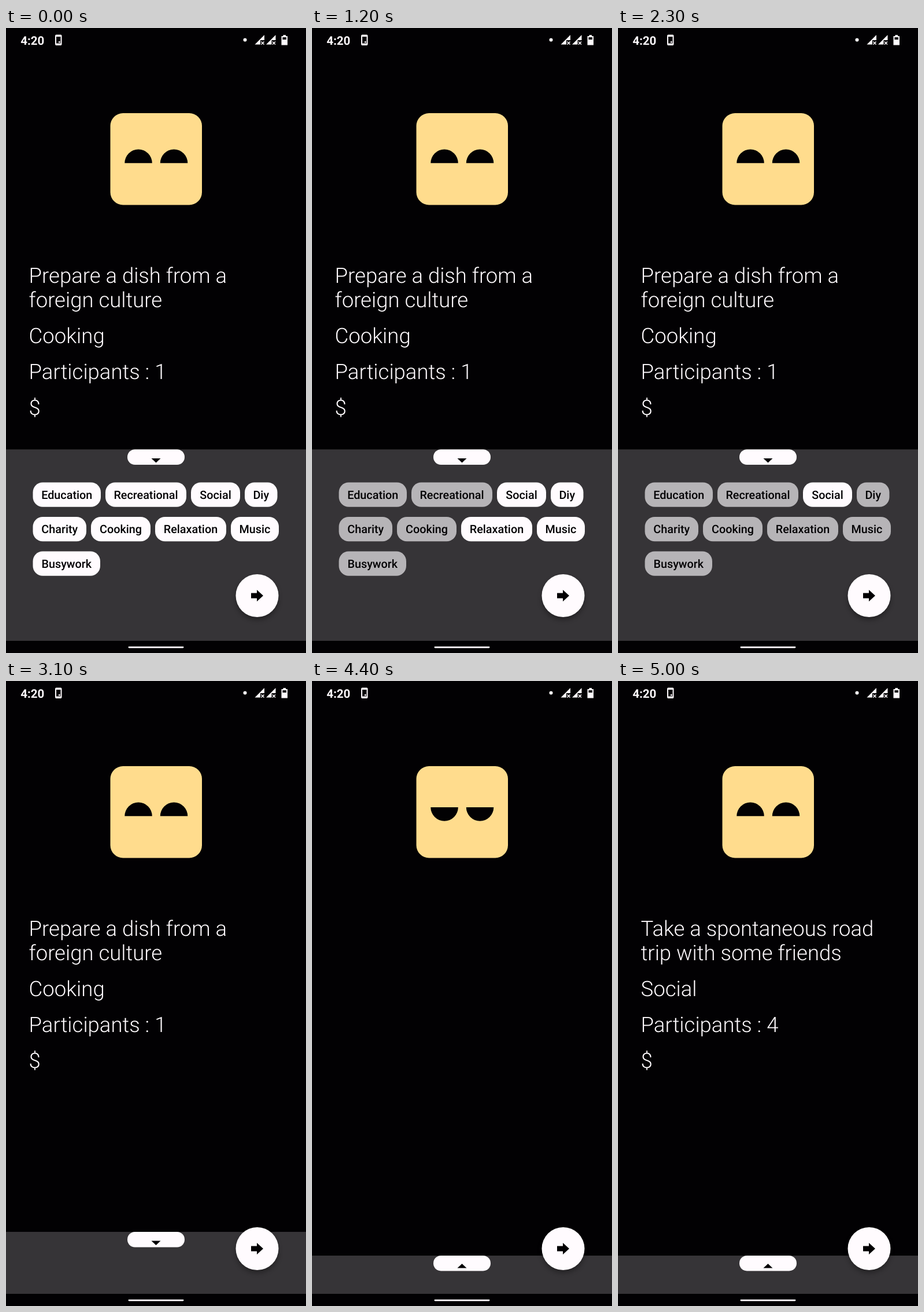
Animation, 519 px wide and 1079 px high, one loop 5.3 s. Source, as an HTML page:

```html
<!DOCTYPE html>
<html lang="en">
<head>
<meta charset="utf-8">
<style>
  html, body { margin: 0; width: 100%; height: 100%; overflow: hidden; background: #020103; }
  svg { display: block; width: 100%; height: 100%; }
  text { font-family: Roboto, sans-serif; text-rendering: geometricPrecision; }
  .info { font-size: 36.5px; font-weight: 300; fill: #fffbfe; }
  .chip { font-size: 19.8px; font-weight: 500; text-anchor: middle; fill: #020103; }
  .clock { font-size: 20.5px; font-weight: 700; fill: #fffbfe; }
</style>
</head>
<body>
<svg viewBox="0 0 519 1079">
  <defs>
    <filter id="blur" x="-50%" y="-50%" width="200%" height="200%"><feGaussianBlur stdDeviation="5"/></filter>
    <rect id="face" x="180.5" y="147" width="158.5" height="158.5" rx="22" fill="#ffdc8d"/>
    <g id="signal">
      <path d="M0 28.5L16.5 12V21H9.5V28.5Z"/>
      <path d="M11 23.5l5 5m0-5l-5 5" stroke="#fffbfe" stroke-width="1.6"/>
    </g>
  </defs>
  <rect width="519" height="1079" fill="#020103"/>

  <g fill="#fffbfe">
    <text class="clock" x="25.2" y="28.5">4:20</text>
    <path fill-rule="evenodd" d="M87 11.5h7.5a2 2 0 0 1 2 2v14.5a2 2 0 0 1-2 2h-7.5a2 2 0 0 1-2-2v-14.5a2 2 0 0 1 2-2zM87 15v11.5h7.5v-11.5z"/>
    <rect x="91" y="23" width="2.5" height="2.5"/>
    <circle cx="413.5" cy="20.5" r="3"/>
    <use href="#signal" x="430.5"/>
    <use href="#signal" x="450"/>
    <path fill-rule="evenodd" d="M479.5 12h4.5v2h3v15.5h-10.5v-15.5h3zM478.5 16v4h6.5v-4z"/>
  </g>

  <g id="before"></g>
  <g id="loading">
    <use href="#face"/>
    <path d="M205.3 218a23.75 23.75 0 0 0 47.5 0zm61.5 0a23.75 23.75 0 0 0 47.5 0z" fill="#020103"/>
  </g>
  <g id="after"></g>

  <g id="panel">
    <rect width="519" height="400" fill="#363437"/>
    <rect x="210" width="99" height="26.5" rx="13" fill="#fffbfe"/>
    <path id="caret" fill="#020103"/>
    <g id="chips"></g>
  </g>
  <rect y="1058" width="519" height="21" fill="#020103"/>
  <rect x="211.5" y="1067.7" width="96" height="2.8" rx="1.4" fill="#fffbfe"/>

  <circle id="shadow" cx="434.5" cy="985" r="36" filter="url(#blur)"/>
  <circle cx="434.5" cy="980" r="37" fill="#fffbfe"/>
  <g id="press" fill="#1c1b1f">
    <circle cx="434.5" cy="980" r="37" opacity=".04"/>
    <circle cx="436.5" cy="969" r="4.5" opacity=".09"/>
  </g>
  <path d="M424 975.5h10v-5.5l11 10-11 10v-5.5h-10z" fill="#020103"/>
</svg>
<script>
const $ = id => document.getElementById(id);
const clamp = v => Math.min(1, Math.max(0, v));
const span = (t, start, length) => clamp((t - start) / length);
const smooth = p => p * p * (3 - 2 * p);
const fade = (id, v) => $(id).setAttribute('opacity', v);

const LOOP = 5300, STEP = 100;
const OPEN_Y = 727.5, CLOSED_Y = 992;

function fillScene(id, lines) {
  const baselines = [440, 482, 544, 606, 668.3];
  $(id).innerHTML = `<use href="#face"/>
    <path d="M205.3 233.3a23.75 23.75 0 0 1 47.5 0zm61.5 0a23.75 23.75 0 0 1 47.5 0z" fill="#020103"/>` +
    lines.map((s, i) => `<text class="info" x="39.6" y="${baselines[i]}">${s}</text>`).join('');
}
fillScene('before', ['Prepare a dish from a', 'foreign culture', 'Cooking', 'Participants : 1', '$']);
fillScene('after', ['Take a spontaneous road', 'trip with some friends', 'Social', 'Participants : 4', '$']);

// label, left, right, row, time of tap
const chips = [
  ['Education', 46.5, 164, 0, 200], ['Recreational', 172, 312, 0, 1100],
  ['Social', 320, 405, 0, Infinity], ['Diy', 413, 469.5, 0, 2200],
  ['Charity', 46.5, 139, 1, 500], ['Cooking', 147, 250, 1, 1000],
  ['Relaxation', 258, 381, 1, 1600], ['Music', 389, 472, 1, 2100],
  ['Busywork', 46.5, 163, 2, 600]
];
$('chips').innerHTML = chips.map(([label, left, right, row]) => {
  const y = 57 + row * 59.5;
  return `<rect x="${left}" y="${y}" width="${right - left}" height="42.3" rx="17"/>
    <text class="chip" x="${(left + right) / 2}" y="${y + 28}">${label}</text>`;
}).join('');
const chipBoxes = $('chips').querySelectorAll('rect');

function draw(now) {
  // the screen refreshes ten times a second
  const t = Math.floor((now % LOOP) / STEP) * STEP;

  chips.forEach((chip, i) => {
    const p = span(t, chip[4] - STEP, 2 * STEP);
    const mix = (a, b) => Math.round(a + (b - a) * p);
    chipBoxes[i].setAttribute('fill', `rgb(${mix(255, 182)},${mix(251, 180)},${mix(254, 183)})`);
  });

  const slide = 1 - (1 - span(t, 3000, 200)) ** 2.69;
  $('panel').setAttribute('transform', `translate(0 ${OPEN_Y + (CLOSED_Y - OPEN_Y) * slide})`);
  $('caret').setAttribute('d', slide < 1 ? 'M251.5 15.5h16l-8 7.5z' : 'M251.5 21.5h16l-8-7.5z');
  fade('chips', t < 3100 ? 1 : 0);

  const press = span(t, 3500, 200) * (1 - span(t, 3700, 200));
  fade('press', press);
  fade('shadow', 0.4 + 0.15 * press);
  $('shadow').setAttribute('cy', 985 + 3 * press);

  const out = smooth(span(t, 3700, 700));
  const back = smooth(span(t, 4400, 600));
  fade('before', 1 - out);
  fade('loading', out * (1 - back));
  fade('after', back);
}

const start = performance.now();
(function tick() {
  draw(performance.now() - start);
  requestAnimationFrame(tick);
})();
</script>
</body>
</html>
```
